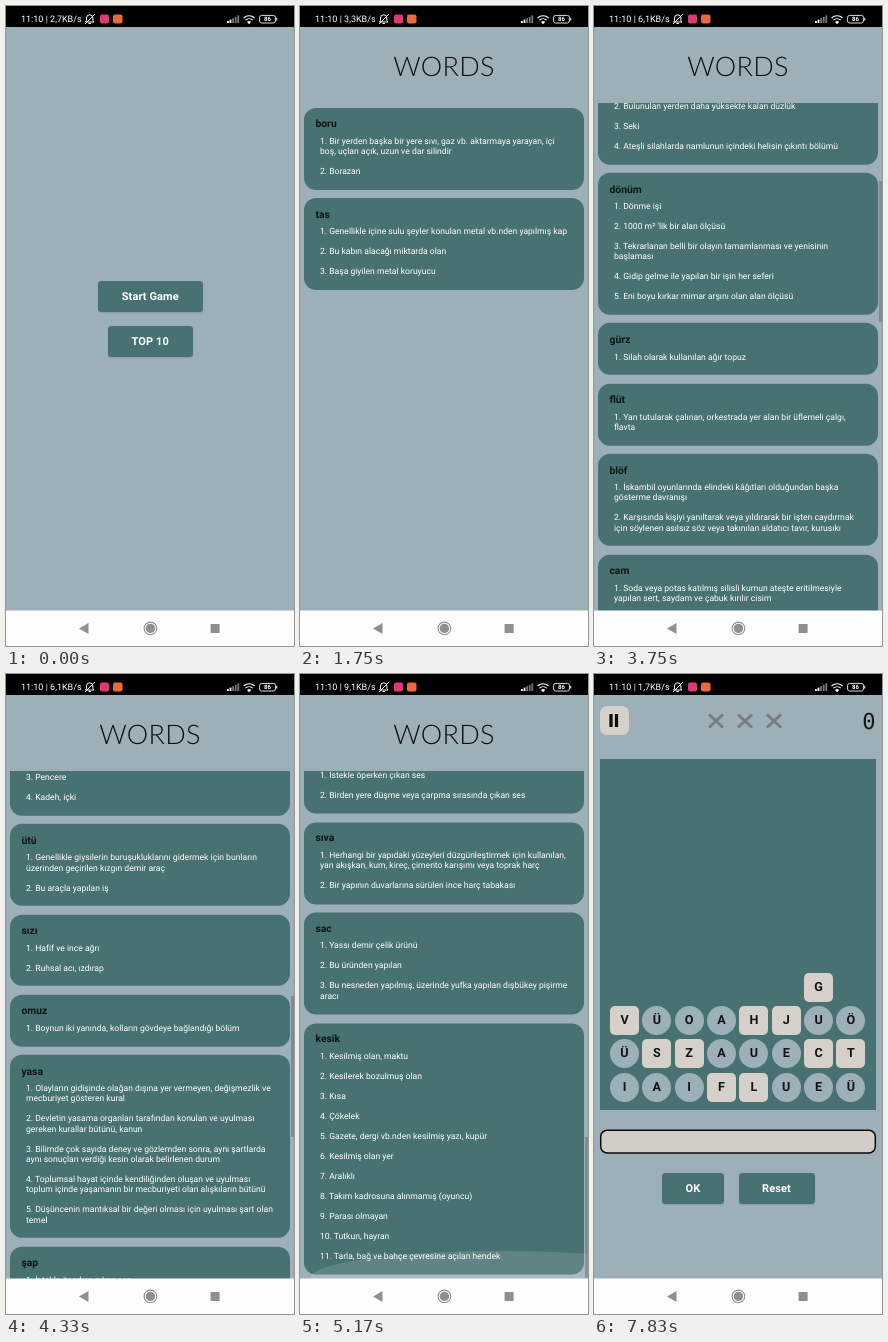
An HTML page for the animation above (8 s loop, 288x640 px).

```html
<!DOCTYPE html>
<html lang="tr">
<head>
<meta charset="utf-8">
<title>Word game</title>
<style>
html, body { margin: 0; width: 100%; height: 100%; overflow: hidden; background: #9dafb7; }
#stage { position: relative; width: 288px; height: 640px; overflow: hidden;
  font-family: Roboto, "Noto Sans", sans-serif; text-rendering: geometricPrecision; }
#stage div { position: absolute; box-sizing: border-box; white-space: pre; }
#stage .screen { inset: 0; background: #9dafb7; }
#stage .title { top: 43px; width: 100%; text-align: center; font: 300 27px/34px Lato, sans-serif;
  letter-spacing: .3px; color: #0c1011; }
#stage .btn { background: #487271; border-radius: 3.5px; color: #fff; font-weight: 700; font-size: 11px;
  text-align: center; letter-spacing: .1px; box-shadow: 0 1px 1.5px #0002; }
#stage .list { top: 97px; left: 0; width: 288px; height: 508px; overflow: hidden; }
#stage .rows { top: .6px; left: 0; width: 288px; padding: 4.2px 4px; }
#stage .card { position: relative; background: #487271; border-radius: 12px; margin-bottom: 8.4px;
  padding: 10.5px 0 9.3px 11.5px; }
#stage .card b { display: block; font-size: 10.3px; line-height: 12px; color: #0c1414; }
#stage .card p { margin: 0; padding: 6.6px 0 3.1px 4.5px; font-size: 8.58px; line-height: 10.3px; color: #fff; }
#stage .thumb { right: 0; width: 3px; background: #0003; }
#stage .glow { left: 10px; top: 480px; width: 380px; height: 54px; border-radius: 50%; background: #fff; }
#stage .rank { position: relative; height: 40px; margin-bottom: 9px; padding: 0 16px; border-radius: 12px;
  background: #487271; color: #fff; font-size: 11px; line-height: 40px; display: flex; justify-content: space-between; }
#stage .tile { width: 29px; height: 29px; border-radius: 5px; background: #d5d1ca; color: #101414;
  font-weight: 700; font-size: 12.6px; line-height: 30px; text-align: center; }
#stage .vowel { border-radius: 50%; background: #9dafb7; }
#stage svg { position: absolute; left: 0; top: 0; }
#speed { left: 15px; top: 8px; color: #fff; font-size: 9px; line-height: 12px; }
</style>
</head>
<body>
<div id="stage"></div>
<script>
const stage = document.getElementById('stage');

function add(parent, cls, text = '', box) {
  const el = document.createElement('div');
  el.className = cls;
  el.textContent = text;
  if (box) {
    ['left', 'top', 'width', 'height'].forEach((p, i) => el.style[p] = box[i] + 'px');
    if (cls === 'btn') el.style.lineHeight = box[3] + 'px';
  }
  parent.append(el);
  return el;
}

function addSvg(parent, body) {
  parent.insertAdjacentHTML('beforeend', `<svg width="288" height="640" fill="none">${body}</svg>`);
}

// One word per paragraph; "|" breaks a long definition.
const shortList = `boru
Bir yerden başka bir yere sıvı, gaz vb. aktarmaya yarayan, içi|boş, uçları açık, uzun ve dar silindir
Borazan

tas
Genellikle içine sulu şeyler konulan metal vb.nden yapılmış kap
Bu kabın alacağı miktarda olan
Başa giyilen metal koruyucu`;

const longList = `göl
Tatlı veya tuzlu durgun su birikintisi

iz
Bir şeyin geçtiği veya önce bulunduğu yerde bıraktığı belirti,|nişan

kova
Su taşımaya yarayan kap
Bu kabın alacağı miktarda olan

set
Toprağın kaymasını veya suyun akmasını önlemek için yapılan|kalın duvar
Bulunulan yerden daha yüksekte kalan düzlük
Seki
Ateşli silahlarda namlunun içindeki helisin çıkıntı bölümü

dönüm
Dönme işi
1000 m² 'lik bir alan ölçüsü
Tekrarlanan belli bir olayın tamamlanması ve yenisinin|başlaması
Gidip gelme ile yapılan bir işin her seferi
Eni boyu kırkar mimar arşını olan alan ölçüsü

gürz
Silah olarak kullanılan ağır topuz

flüt
Yan tutularak çalınan, orkestrada yer alan bir üflemeli çalgı,|flavta

blöf
İskambil oyunlarında elindeki kâğıtları olduğundan başka|gösterme davranışı
Karşısında kişiyi yanıltarak veya yıldırarak bir işten caydırmak|için söylenen asılsız söz veya takınılan aldatıcı tavır, kurusıkı

cam
Soda veya potas katılmış silisli kumun ateşte eritilmesiyle|yapılan sert, saydam ve çabuk kırılır cisim
Bu cisimden yapılmış olan
Pencere
Kadeh, içki

ütü
Genellikle giysilerin buruşukluklarını gidermek için bunların|üzerinden geçirilen kızgın demir araç
Bu araçla yapılan iş

sızı
Hafif ve ince ağrı
Ruhsal acı, ızdırap

omuz
Boynun iki yanında, kolların gövdeye bağlandığı bölüm

yasa
Olayların gidişinde olağan dışına yer vermeyen, değişmezlik ve|mecburiyet gösteren kural
Devletin yasama organları tarafından konulan ve uyulması|gereken kurallar bütünü, kanun
Bilimde çok sayıda deney ve gözlemden sonra, aynı şartlarda|aynı sonuçları verdiği kesin olarak belirlenen durum
Toplumsal hayat içinde kendiliğinden oluşan ve uyulması|toplum içinde yaşamanın bir mecburiyeti olan alışkıların bütünü
Düşüncenin mantıksal bir değeri olması için uyulması şart olan|temel

şap
İstekle öperken çıkan ses
Birden yere düşme veya çarpma sırasında çıkan ses

sıva
Herhangi bir yapıdaki yüzeyleri düzgünleştirmek için kullanılan,|yarı akışkan, kum, kireç, çimento karışımı veya toprak harç
Bir yapının duvarlarına sürülen ince harç tabakası

sac
Yassı demir çelik ürünü
Bu üründen yapılan
Bu nesneden yapılmış, üzerinde yufka yapılan dışbükey pişirme|aracı

kesik
Kesilmiş olan, maktu
Kesilerek bozulmuş olan
Kısa
Çökelek
Gazete, dergi vb.nden kesilmiş yazı, kupür
Kesilmiş olan yer
Aralıklı
Takım kadrosuna alınmamış (oyuncu)
Parası olmayan
Tutkun, hayran
Tarla, bağ ve bahçe çevresine açılan hendek`;

function wordScreen(source) {
  const screen = add(stage, 'screen');
  add(screen, 'title', 'WORDS');
  const list = add(screen, 'list');
  const rows = add(list, 'rows');
  for (const entry of source.split('\n\n')) {
    const [word, ...defs] = entry.split('\n');
    const card = add(rows, 'card');
    const head = document.createElement('b');
    head.textContent = word;
    card.append(head);
    defs.forEach((def, i) => {
      const p = document.createElement('p');
      p.textContent = `${i + 1}. ${def.replace('|', '\n')}`;
      card.append(p);
    });
  }
  return { screen, list, rows };
}

// Menu
const menu = add(stage, 'screen');
const startBtn = add(menu, 'btn', 'Start Game', [92, 274.5, 104.5, 31]);
const topBtn = add(menu, 'btn', 'TOP 10', [102, 320, 84.5, 31]);

// Ranking
const ranking = add(stage, 'screen');
add(ranking, 'title', 'TOP 10');
const ranks = add(add(ranking, 'list'), 'rows');
for (let i = 0; i < 10; i++) {
  const row = add(ranks, 'rank');
  row.innerHTML = `<span>${i + 1}.</span><span>${Math.round(190 * 0.72 ** i)}</span>`;
}

// Word lists
const few = wordScreen(shortList);
const many = wordScreen(longList);
const glow = add(many.list, 'glow');
const thumb = add(many.list, 'thumb');
const viewH = 506.4, contentH = 1816;
thumb.style.height = viewH * viewH / contentH + 'px';

// Game
const game = add(stage, 'screen');
const cross = x => `<path d="M${x - 7} 40.5l14 13m0 -13l-14 13" stroke="#747d80" stroke-width="3"/>`;
addSvg(game, `
  <rect x="6" y="32" width="29" height="29" rx="7" fill="#d5d1ca"/>
  <path d="M17 40v13M22.5 40v13" stroke="#0b0d0d" stroke-width="3.2"/>
  ${[122, 151, 180].map(cross).join('')}
  <text x="274.8" y="55.3" text-anchor="middle" font-family="DejaVu Sans Mono, monospace" font-size="22" fill="#141819">0</text>
  <rect x="6" y="85" width="276" height="351" fill="#487271"/>
  <rect x="6.7" y="456.2" width="274.6" height="22.8" rx="6.5" fill="#d2cec7" stroke="#0a0c0c" stroke-width="1.5"/>`);
add(game, 'btn', 'OK', [68, 499, 62, 31]);
add(game, 'btn', 'Reset', [144.5, 499, 76, 31]);

function tile(letter, col, y) {
  const cls = 'AEIİOÖUÜ'.includes(letter) ? 'tile vowel' : 'tile';
  return add(game, cls, letter, [16 + col * 32.35, y, 29, 29]);
}
['VÜOAHJUÖ', 'ÜSZAUECT', 'IAIFLUEÜ'].forEach((row, r) =>
  [...row].forEach((letter, c) => tile(letter, c, 332 + r * 33.3)));
const faller = tile('G', 6, 298.5);

// System bars
const bar = (i, h) => `<rect x="${221 + i * 2.6}" y="${17 - h}" width="1.8" height="${h}" fill="${i < 2 ? '#fff' : '#777'}"/>`;
addSvg(stage, `
  <rect width="288" height="21" fill="#000"/>
  <rect y="604.5" width="288" height="36" fill="#fdfdfd"/>
  <path d="M80.5 16h-1l1-1.2V12a3.2 3.2 0 0 1 6.4 0v2.8l1 1.2zM82.5 17.5h2.4M79 18L89 8" stroke="#fff"/>
  <rect x="94" y="8.5" width="9" height="9" rx="2" fill="#dd3a72"/>
  <rect x="107" y="8.5" width="9.5" height="9" rx="2" fill="#f0673a"/>
  ${[2, 3.4, 4.8, 6.2, 7.6].map((h, i) => bar(i, h)).join('')}
  <path d="M237.6 12a8 8 0 0 1 11 0M239.4 14.2a5.4 5.4 0 0 1 7.4 0" stroke="#fff" stroke-width="1.1"/>
  <path d="M241 16l2.1 2.2l2.1-2.2a3 3 0 0 0-4.2 0z" fill="#fff"/>
  <rect x="253.6" y="9.4" width="15.8" height="7.6" rx="2" stroke="#ddd"/>
  <path d="M270.7 11.8v2.8" stroke="#ddd" stroke-width="1.2"/>
  <text x="261.5" y="15.4" text-anchor="middle" font-family="Roboto, sans-serif" font-weight="700" font-size="6" fill="#fff">86</text>
  <path d="M82.5 617v11l-9.5-5.5z" fill="#8f8f8f"/>
  <circle cx="144.4" cy="622.4" r="6.3" stroke="#8f8f8f" stroke-width="1.1"/>
  <circle cx="144.4" cy="622.4" r="4.7" fill="#8f8f8f"/>
  <rect x="204.6" y="618" width="9" height="9" fill="#8f8f8f"/>`);
const speed = add(stage, '');
speed.id = 'speed';

// Timeline in steps of 1/12 s.
const STEPS = 96;
const tracks = {
  ranking: [[9, 0], [14, 1], [71, 1], [75, 0]],
  few: [[15, 0], [21, 1], [27, 1], [33, 0]],
  many: [[35, 0], [40, 1], [65, 1], [70, 0]],
  game: [[77, 0], [82, 1]],
  scroll: [[39, 0], [41, 50], [45, 276.2], [52, 805.2], [56, 1090], [61, 1309.6]],
  glow: [[60, 0], [62, 0.13], [66, 0]],
  fall: [[80, -210], [86, 0]],
  topPress: [[7, 1], [8, 0.75], [10, 0.75], [12, 1]],
  startPress: [[77, 1], [78, 0.75], [80, 1]]
};
const speeds = [[79, '1,7'], [56, '9,1'], [34, '6,1'], [12, '3,3'], [0, '2,7']];

function value(name, k) {
  const keys = tracks[name];
  const i = keys.findIndex(key => key[0] > k);
  if (i < 0) return keys[keys.length - 1][1];
  if (i === 0) return keys[0][1];
  const [[k0, v0], [k1, v1]] = [keys[i - 1], keys[i]];
  return v0 + (v1 - v0) * (k - k0) / (k1 - k0);
}

function show(el, v) {
  const e = 1 - (1 - v) ** 2;
  el.style.opacity = e;
  el.style.visibility = v > 0 ? 'visible' : 'hidden';
  el.style.transform = v < 1 ? `translateY(${(1 - e) * 46}px)` : 'none';
}

function draw(k) {
  show(ranking, value('ranking', k));
  show(few.screen, value('few', k));
  show(many.screen, value('many', k));
  show(game, value('game', k));
  const scroll = value('scroll', k);
  many.rows.style.transform = `translateY(${-scroll}px)`;
  thumb.style.top = 0.6 + scroll / contentH * viewH + 'px';
  thumb.style.opacity = k >= 39 ? 1 : 0;
  glow.style.opacity = value('glow', k);
  faller.style.transform = `translateY(${value('fall', k)}px)`;
  topBtn.style.opacity = value('topPress', k);
  startBtn.style.opacity = value('startPress', k);
  speed.textContent = `11:10 | ${speeds.find(s => k >= s[0])[1]}KB/s`;
}

const begin = performance.now();
function tick() {
  const t = Math.max(0, performance.now() - begin) % 8000;
  draw(Math.floor((t + 4) * 12 / 1000) % STEPS);
  requestAnimationFrame(tick);
}
tick();
</script>
</body>
</html>
```
